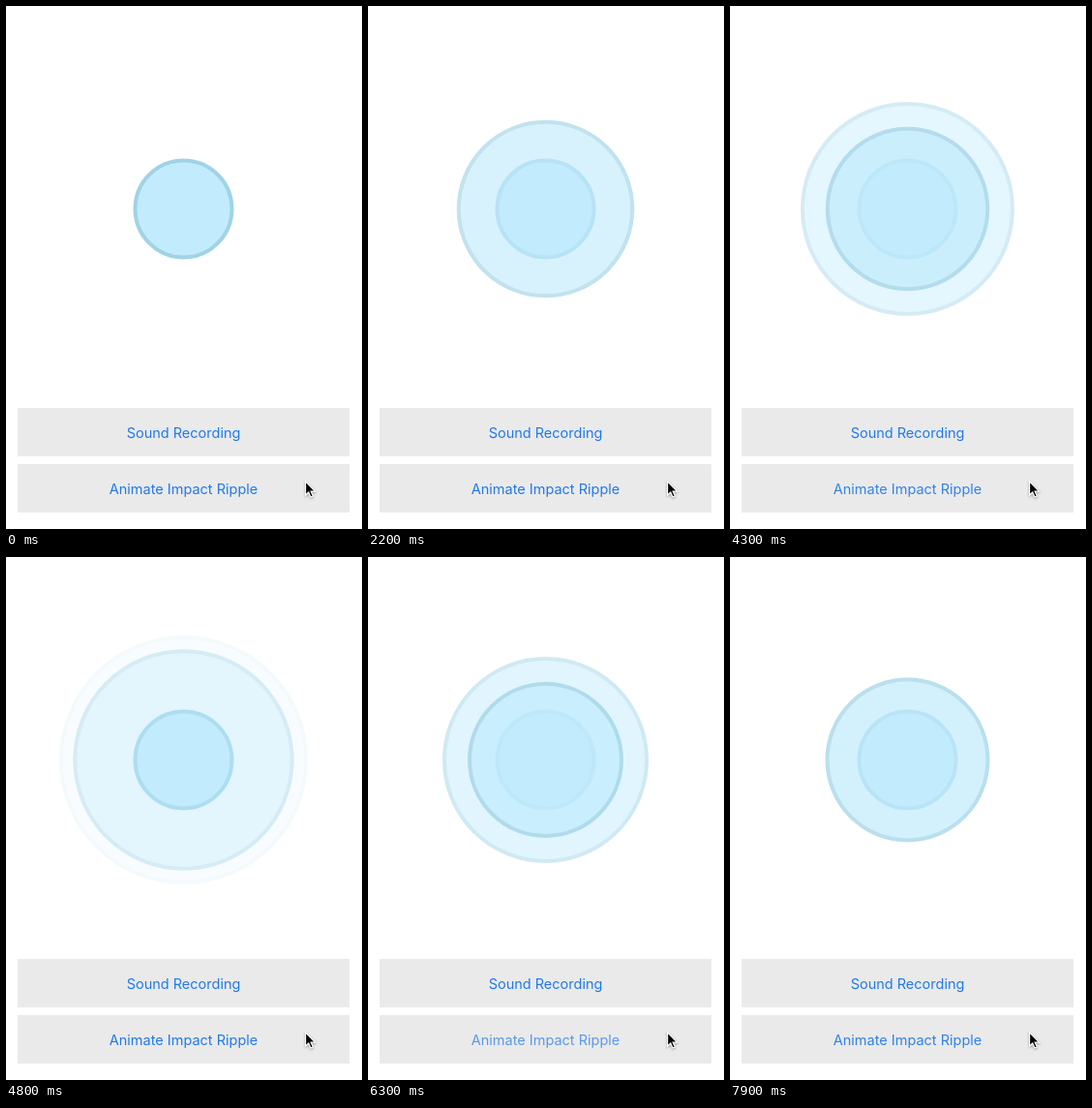
An HTML page for the animation above (8 s loop, 368 by 540 pixels).

```html
<!DOCTYPE html>
<html lang="en">
<head>
<meta charset="utf-8">
<title>Impact ripple</title>
<style>
  html, body { margin: 0; width: 100%; height: 100%; overflow: hidden; background: #fff; }
  svg { display: block; width: 368px; height: 540px; }
  circle { fill: #c2ecfd; stroke: #a0d3e6; stroke-width: 4; }
  rect { fill: #eaeaea; }
  text {
    font: 14.5px Inter, "Liberation Sans", sans-serif;
    fill: #2079e8;
    text-anchor: middle;
  }
  .cursor { fill: #000; stroke: #fff; stroke-width: 1.2; filter: drop-shadow(0 1px 1px rgba(0, 0, 0, .35)); }
</style>
</head>
<body>
<svg viewBox="0 0 368 540">
  <circle cx="183.5" cy="209.5" r="50"/>
  <g id="ripples"></g>
  <rect x="12" y="415" width="343" height="50"/>
  <rect x="12" y="473" width="343" height="50"/>
  <text x="183.5" y="445.6">Sound Recording</text>
  <text id="label" x="183.5" y="503.6">Animate Impact Ripple</text>
  <path class="cursor" d="M309.6 490.8v14.2l3.2-3 2.2 5 2.4-1-2.2-4.9h4.4z"/>
</svg>
<script>
  const LOOP = 8000, LIFE = 1500;
  const START_R = 50, END_R = 128;
  const taps = [1675, 3455, 3880, 5530, 5940, 7476];
  const layer = document.getElementById('ripples');
  const label = document.getElementById('label');

  const clamp = v => Math.min(1, Math.max(0, v));

  // cubic-bezier(0, 0, .58, 1)
  function easeOut(x) {
    let lo = 0, hi = 1;
    for (let i = 0; i < 20; i++) {
      const s = (lo + hi) / 2;
      if (1.74 * s * s - 0.74 * s ** 3 < x) lo = s; else hi = s;
    }
    return lo * lo * (3 - 2 * lo);
  }

  const rings = taps.map(() => {
    const ring = document.createElementNS('http://www.w3.org/2000/svg', 'circle');
    ring.setAttribute('cx', 183.5);
    ring.setAttribute('cy', 209.5);
    layer.append(ring);
    return ring;
  });

  // The label dims quickly on press and recovers after release.
  function labelAlpha(age) {
    const dim = clamp((age + 50) / 120) * clamp((450 - age) / 250);
    return 1 - 0.8 * dim;
  }

  function draw() {
    const t = performance.now() % LOOP;
    let alpha = 1;
    taps.forEach((tap, i) => {
      const age = t - tap, p = clamp(age / LIFE);
      rings[i].setAttribute('r', START_R + (END_R - START_R) * easeOut(p));
      rings[i].setAttribute('opacity', (1 - p) * clamp(age / 110));
      alpha = Math.min(alpha, labelAlpha(age));
    });
    label.setAttribute('opacity', alpha);
    requestAnimationFrame(draw);
  }
  draw();
</script>
</body>
</html>
```
